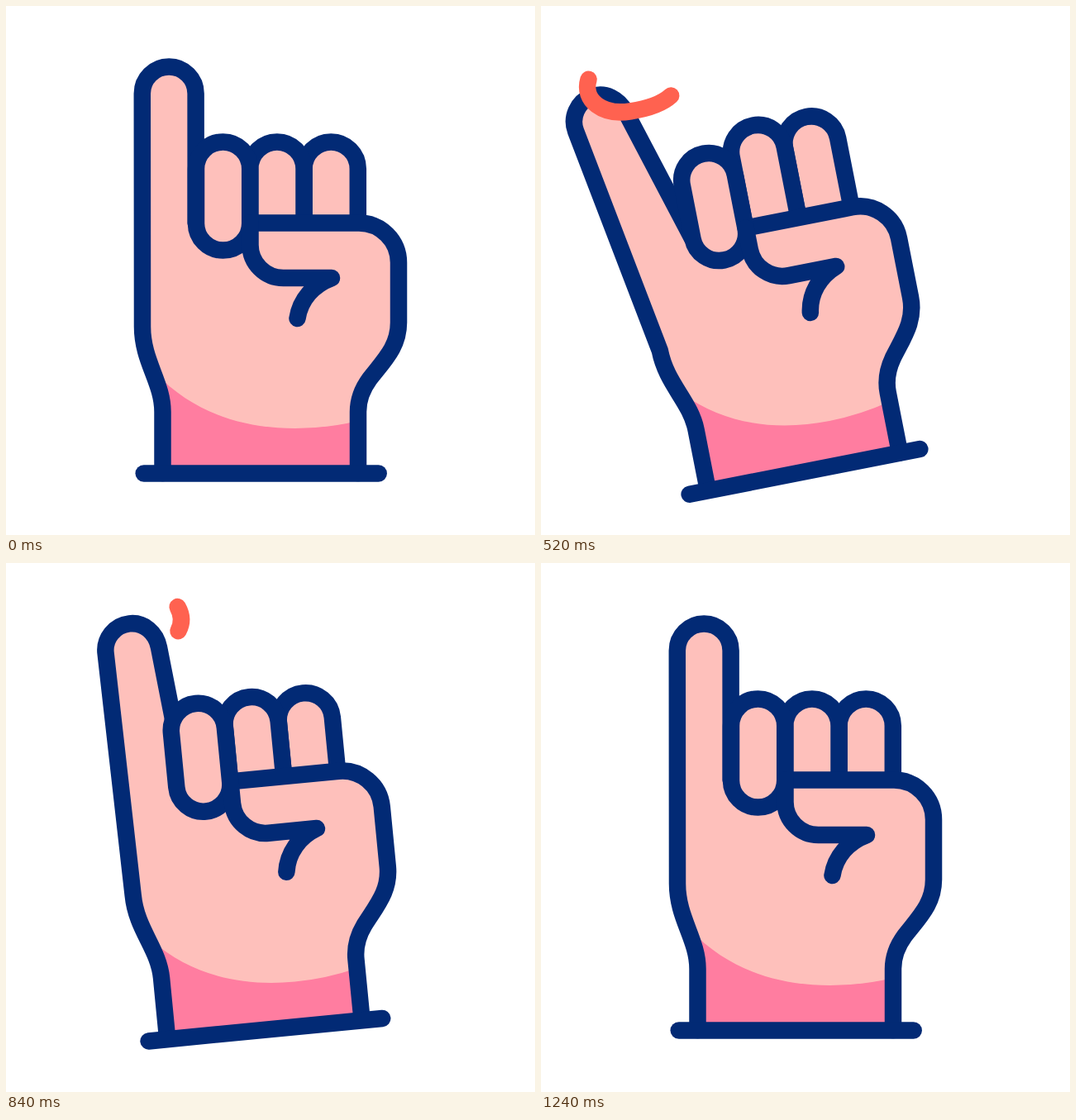
An HTML page for the animation above (2000 ms loop, 640 by 640 pixels).

```html
<!DOCTYPE html>
<html lang="en">
<head>
<meta charset="utf-8">
<title>Pinky wave</title>
<style>
  html, body { margin: 0; width: 100%; height: 100%; overflow: hidden; background: #fff; }
  svg { display: block; width: 100vw; height: 100vh; }
  .line { stroke: #022a75; stroke-width: 20.5; stroke-linecap: round; stroke-linejoin: round; fill: none; }
  .skin { fill: #fec0bb; }
  .trail { stroke: #ff6250; stroke-width: 20.5; stroke-linecap: round; fill: none; }
</style>
</head>
<body>
<svg viewBox="0 0 640 640">
  <g id="hand">
    <path id="index" class="line skin"/>
    <path id="middle" class="line skin"/>
    <path id="fill" class="skin"/>
    <path fill="#ff7da0" d="M181 444C228 494 290 511 350 511Q388 511 426 502V565H189.5V491C189.5 474 185 459 181 444Z"/>
    <path id="outline" class="line"/>
    <path class="line skin" d="M230 197a32.6 32.6 0 0 1 65.2 0V263a32.6 32.6 0 0 1-65.2 0Z"/>
    <path class="line" d="M295.5 262.5V289A40 40 0 0 0 335.5 329H394C372 337 356 355 352.5 378"/>
    <path class="line" d="M166.7 565.5H450.7"/>
    <path id="trailLeft" class="trail" pathLength="1" d="M143.5 49.5C131 73 152 96 186 97C207 98 226 95 237.5 88"/>
    <path id="trailRight" class="trail" pathLength="1" d="M252.4 46C264 72 240 94 207 96C183 98 162 93 149 76.5"/>
  </g>
</svg>
<script>
const LOOP = 2000, STEP = 40;
const $ = id => document.getElementById(id);

// Tracks of [time, value], eased with a sine between keys
const tracks = {
  turn:  [[160, 0], [520, -11.1], [720, 0], [960, -11.1], [1240, 0]],
  tipX:  [[160, 0], [520, -49], [680, 31], [960, -27], [1240, 0]],
  tipY:  [[160, 0], [520, -3.5], [680, -14], [960, -12.5], [1240, 0]],
  root:  [[520, 0], [680, 20], [960, 7], [1240, 0]],
  left:  [[340, 0], [520, 1], [680, 0]],
  right: [[520, 0], [680, 1], [910, 0]],
  index: [[160, 0], [460, 22], [760, 0]],
  middle: [[160, 0], [530, 22], [900, 0]]
};

function at(keys, t) {
  if (t <= keys[0][0]) return keys[0][1];
  for (let i = 1; i < keys.length; i++) {
    const [t0, a] = keys[i - 1], [t1, b] = keys[i];
    if (t < t1) return a + (b - a) * (1 - Math.cos(Math.PI * (t - t0) / (t1 - t0))) / 2;
  }
  return keys[keys.length - 1][1];
}

const finger = (x, lift) =>
  `M${x} 262V${197 - lift}a32.6 32.6 0 0 1 65.2 0V262`;

function body(dx, dy, root) {
  const r = 32.4, x = 197.2 + dx, y = 106 + dy, rootX = 229.7 + root, rootY = 263;
  const tilt = Math.atan2(dx, 388 - y);
  const c = r * Math.cos(tilt), s = r * Math.sin(tilt);
  const endX = x + c, endY = y + s;
  // The right half of the tip runs smoothly into the finger's right side
  const k = 0.552, side = k * r / Math.hypot(endX - rootX, endY - rootY);
  return `M189.5 565V491C189.5 455 165 430 165 388L${x - c} ${y - s}` +
    `A${r} ${r} 0 0 1 ${x + s} ${y - c}` +
    `C${x + s + k * c} ${y - c + k * s} ` +
    `${endX + side * (endX - rootX)} ${endY + side * (endY - rootY)} ` +
    `${endX} ${endY}L${rootX} ${rootY}` +
    `L295.5 262.5H427A48 48 0 0 1 475 310.5V383` +
    `C475 412 458 428 440 451Q426 470 426 491V565`;
}

function trim(path, k) {
  path.style.display = k > 0.001 ? "" : "none";
  path.setAttribute("stroke-dasharray", `${k} 2`);
}

function draw(t) {
  const v = {};
  for (const name in tracks) v[name] = at(tracks[name], t);
  $("hand").setAttribute("transform", `rotate(${v.turn} 303 511.5)`);
  $("index").setAttribute("d", finger(360.6, v.index));
  $("middle").setAttribute("d", finger(295.3, v.middle));
  const d = body(v.tipX, v.tipY, v.root);
  $("fill").setAttribute("d", d);
  $("outline").setAttribute("d", d);
  trim($("trailLeft"), v.left);
  trim($("trailRight"), v.right);
}

function tick() {
  const t = performance.now() % LOOP;
  draw(Math.floor(t / STEP) * STEP);
  requestAnimationFrame(tick);
}
tick();
</script>
</body>
</html>
```
